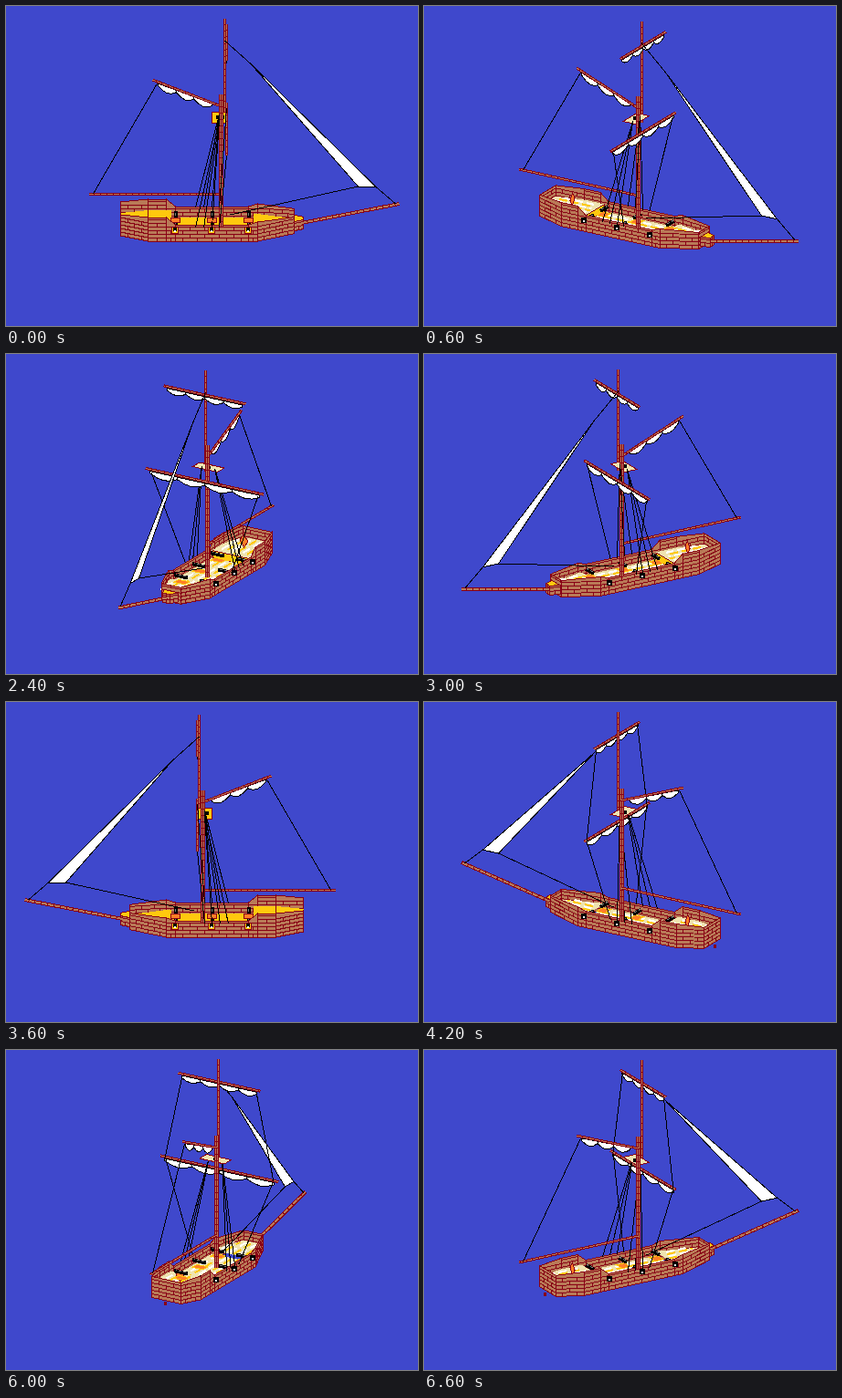
These frames come from a looping animation (451 px wide and 351 px high, 7.2 s). An HTML page:

```html
<!DOCTYPE html>
<html lang="en">
<head>
<meta charset="utf-8">
<title>Turning ship</title>
<style>
html, body { margin: 0; width: 100%; height: 100%; overflow: hidden; background: #3f48cc; }
svg { display: block; }
</style>
</head>
<body>
<svg id="stage" width="451" height="351" viewBox="0 0 451 351" shape-rendering="crispEdges"></svg>
<script>
const stage = document.getElementById('stage');
const RED = '#880015', BROWN = '#b97a57', GOLD = '#ffc90e', CREAM = '#efe4b0', ORANGE = '#ff7f27';
const STEP = 600, PLANK = 4;

let out, ux, uy, vx, vy;

// Hull shape along x (forward): half width, gunwale height and keel height.
const half = x => 25 - Math.max(0, -70 - x) / 4 - Math.max(0, x - 50) / 3;
const rail = x => x < -45 ? 222 : x > 45 ? 227 : 230;
const keel = x => x < -70 || x > 50 ? 245 : 248;

const mirror = pts => pts.concat(pts.map(([x, y, z]) => [x, -y, z]).reverse());
const ring = (xs, height) => mirror(xs.map(x => [x, half(x), height(x)]));
const hull = ring([-100, -70, -50, -40, 40, 50, 90], rail);

// Axes are rounded to tenths, which gives the ship its stepped perspective.
const tenth = n => Math.round(n * 10) / 10;
const axis = k => [tenth(Math.cos(k * Math.PI / 6)), tenth(.4 * Math.sin(k * Math.PI / 6))];

const at = ([x, y, z]) => [225.5 + x * ux + y * vx, z + x * uy + y * vy];
const lerp = (a, b, t) => a.map((v, i) => v + (b[i] - v) * t);
const lift = ([x, y], z) => [x, y, z];
const str = pts => pts.map(p => p.map(n => n.toFixed(1)).join()).join(' ');

function flat(pts, fill, stroke = 'none') {
  out += `<polygon points="${str(pts)}" fill="${fill}" stroke="${stroke}"/>`;
}
const poly = (pts, fill, stroke) => flat(pts.map(at), fill, stroke);

function line(a, b, color = '#000', width = 1, dash = '') {
  out += `<polyline points="${str([at(a), at(b)])}" stroke="${color}" stroke-width="${width}" stroke-dasharray="${dash}"/>`;
}

function spar(a, b, width) {
  line(a, b, RED, width);
  line(a, b, BROWN, width - 2, '6 1');
  if (width > 4) line(a, b, RED);
}

function wall(a, b, base) {
  const a0 = lift(a, base(a[0])), b0 = lift(b, base(b[0]));
  poly([a, b, b0, a0], BROWN, RED);
  const joints = Math.max(1, Math.round(Math.hypot(b[0] - a[0], b[1] - a[1]) / 16));
  for (let r = 1; ; r++) {
    const za = a0[2] - r * PLANK, zb = b0[2] - r * PLANK;
    if (za <= a[2] || zb <= b[2]) break;
    const l = lift(a, za), q = lift(b, zb);
    line(l, q, RED);
    for (let j = 0; j < joints; j++) {
      const p = lerp(l, q, (j + r % 2 / 2) / joints);
      line(p, lift(p, p[2] + PLANK), RED);
    }
  }
}

function walls(pts, base, near) {
  pts.forEach((a, i) => {
    const b = pts[(i + 1) % pts.length];
    if ((at(b)[0] > at(a)[0] + .1) === near) wall(a, b, base);
  });
}

function deck(xs, z) {
  poly(ring(xs, () => z), uy ? CREAM : GOLD);
  if (!uy) return;
  const x0 = xs[0] + 3, x1 = xs[xs.length - 1] - 3;
  for (let y = -18; y <= 18; y += 6) {
    const inset = Math.abs(y) / 3;
    line([x0 + inset, y, z], [x1 - inset, y, z], y % 12 ? '#fff' : GOLD, 2, '9 4');
  }
}

function decks() {
  const parts = [
    () => {
      deck([-100, -70, -45], 234);
      if (uy > 0) poly([[-45, -24, 234], [-45, 24, 234], [-45, 24, 242], [-45, -24, 242]], GOLD, RED);
      poly([[-70, 0, 219], [-70, 5, 226], [-70, 0, 233], [-70, -5, 226]], ORANGE, RED);
    },
    () => deck([-45, 45], 242),
    () => deck([45, 50, 90], 238)
  ];
  if (uy < 0) parts.reverse();
  parts.forEach(f => f());
}

function gun(x, s) {
  poly([[x - 5, s * 8, 241], [x + 5, s * 8, 241], [x + 5, s * 21, 241], [x - 5, s * 21, 241]],
       ORANGE, uy ? GOLD : RED);
  line([x, s * 7, 235], [x, s * 24, 235], '#000', 4);
  line([x, s * 10, 234], [x, s * 22, 234], '#7f7f7f', 1, '3 2');
}

function muzzle(x, s) {
  const [cx, cy] = at([x, s * 28, 235]).map(Math.floor);
  const box = (r, c, dy = 0) =>
    out += `<rect x="${cx - r}" y="${cy - r + dy}" width="${2 * r}" height="${2 * r}" fill="${c}"/>`;
  box(uy ? 3 : 4, uy ? '#000' : RED);
  if (!uy) box(3, GOLD);
  box(2, '#000', -1);
  box(1, '#fff', 1);
}

// Furled canvas hanging in folds below a spar.
function furl(a, b, folds, drop) {
  const A = at(a), B = at(b), pts = [A, B];
  for (let i = folds * 4; i >= 0; i--) {
    const [x, y] = lerp(A, B, i / folds / 4);
    pts.push([x, y + drop * (.35 + .65 * Math.sin(i % 4 / 4 * Math.PI))]);
  }
  flat(pts, '#fff', '#000');
  for (let i = 1; i < folds; i++) {
    const p = lerp(a, b, i / folds);
    line(p, lift(p, p[2] + drop * .5));
  }
}

function yard(z, w, drop) {
  furl([16, -w * .92, z + 2], [16, w * .92, z + 2], 4, drop);
  spar([16, -w, z], [16, w, z], 3);
}

function foreSails() {
  const peak = [43, 0, 64], clew = [160, 0, 198], tack = [179, 0, 198];
  line([14, 0, 38], peak);
  line(tack, [201, 0, 217]);
  line(clew, [20, 0, 229]);
  poly([peak, clew, tack], '#fff', '#000');
}

function yards() {
  yard(40, 50, 6);
  yard(135, 72, 7);
  for (const s of [-1, 1]) {
    line([16, s * 65, 138], [8, s * 28, 232]);
    if (uy < 0) line([16, s * 45, 42], [16, s * 66, 136]);
  }
}

function aftSail() {
  spar([10, 0, 206], [-135, 0, 206], 3);
  furl([-59, 0, 85], [0, 0, 107], 3, 7);
  spar([10, 0, 110], [-65, 0, 81], 3);
  line([-60, 0, 85], [-130, 0, 206]);
}

function masts() {
  spar([14, 0, 14], [14, 0, 125], 3);
  poly([[0, -15, 122], [15, -15, 122], [15, 15, 122], [0, 15, 122]], uy ? CREAM : GOLD, RED);
  line([4, 0, 122], [13, 0, 122], '#000', 4);
  spar([10, 0, 97], [10, 0, 242], 5);
}

function shrouds() {
  for (const s of [-1, 1])
    for (let x = -18; x <= 0; x += 9) line([8, s * 8, 122], [x, s * 28, 232]);
}

function bow() {
  const beak = mirror([[90, 9, 233], [100, 4, 233]]);
  walls(beak, () => 243, true);
  poly(beak, GOLD, RED);
  spar([98, 0, 238], [205, 0, 217], 4);
}

function draw(k) {
  [ux, uy] = axis(k);
  [vx, vy] = axis(k + 3);
  out = '<g fill="none">';
  if (uy < 0) {
    bow();
    line([-103, 0, 245], [-103, 0, 249], RED, 3);
  }
  walls(hull, keel, false);
  decks();
  const far = vy < 0 ? 1 : -1;
  for (const s of [far, -far])
    for (let x = -40; x <= 40; x += 40) gun(x, s);
  walls(hull, keel, true);
  if (vy) for (let x = -40; x <= 40; x += 40) muzzle(x, -far);
  if (uy >= 0) bow();

  const rig = [aftSail, masts, shrouds, yards, foreSails];
  if (uy < 0) rig.reverse();
  rig.forEach(f => f());
  stage.innerHTML = out + '</g>';
}

let shown = -1;
function tick(now) {
  const k = Math.floor(now / STEP) % 12;
  if (k !== shown) draw(shown = k);
  requestAnimationFrame(tick);
}
draw(shown = 0);
requestAnimationFrame(tick);
</script>
</body>
</html>
```
